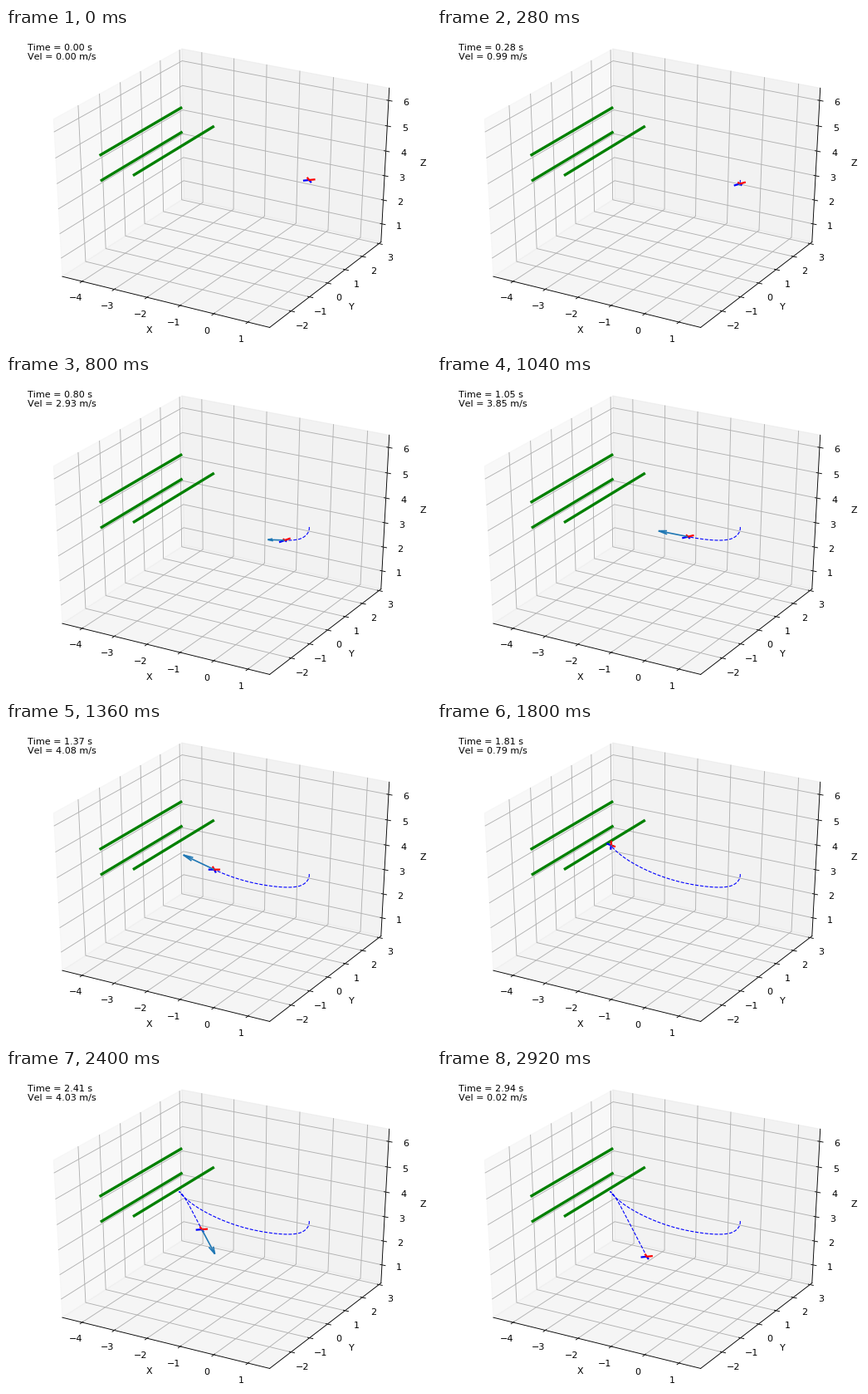
A matplotlib script for the animation above (2.96 s loop, 512 by 384 pixels).

```python
import numpy as np
import matplotlib.pyplot as plt
from matplotlib.animation import FuncAnimation
from matplotlib.patches import Polygon

W, H, DPI = 512, 384, 80
FRAMES, INTERVAL = 74, 40
DT = 0.04022                      # simulated seconds per frame

plt.rcParams["font.family"] = "DejaVu Sans"
plt.rcParams["text.kerning_factor"] = 6

# Perspective camera looking at a cube of data space
CENTER = np.array([-1.497, 0.0, 3.355])
SIZE, DIST = 6.0, 10.0
ELEV, AZIM = np.radians(30), np.radians(-60)
SE, CE, SA, CA = np.sin(ELEV), np.cos(ELEV), np.sin(AZIM), np.cos(AZIM)
RIGHT = np.array([-SA, CA, 0])
UP = np.array([-SE * CA, -SE * SA, CE])
TOWARD = np.array([CE * CA, CE * SA, SE])


def project(points):
    """Data points (n, 3) to stage pixels, y pointing down."""
    d = (np.asarray(points, float) - CENTER) / SIZE
    depth = DIST - d @ TOWARD
    px = W * (d @ RIGHT / depth + 0.095) / 0.185
    py = H - H * (d @ UP / depth + 0.095) / 0.185
    return px, py


fig = plt.figure(figsize=(W / DPI, H / DPI), dpi=DPI, facecolor="white")
ax = fig.add_axes([0, 0, 1, 1])
ax.set_xlim(0, W)
ax.set_ylim(H, 0)
ax.axis("off")


def line3d(points, **style):
    return ax.plot(*project(points), **style)[0]


def label3d(point, text, va):
    px, py = project([point])
    ax.text(px[0], py[0], text, fontsize=10, ha="center", va=va)


# Box: three panes meeting in the far corner, then the axes
LO, HI = CENTER - SIZE * 25 / 48, CENTER + SIZE * 25 / 48
DELTA = SIZE / 12
PER_POINT = 48 / (72 * (W + H) / DPI) * DELTA
FAR = np.where([0, 1, 0], HI, LO)


def flipped(p, i):
    p = p.copy()
    p[i] = LO[i] + HI[i] - p[i]
    return p


def draw_pane(i, shade):
    j, k = (n for n in range(3) if n != i)
    side, top = flipped(FAR, j), flipped(FAR, k)
    corners = [FAR, side, flipped(side, k), top]
    ax.add_patch(Polygon(np.column_stack(project(corners)), facecolor=shade,
                         edgecolor=shade, alpha=0.5, lw=1, zorder=0))


def draw_axis(name, i, j, k, ticks):
    """Axis i, on the far side of direction j; its grid then turns along k."""
    edge = flipped(FAR, j)
    edge[i] = LO[i]
    end = flipped(edge, i)
    out = np.sign(edge - CENTER)
    out[i] = 0
    step = np.zeros(3)
    step[j] = out[j] * DELTA

    line3d([edge, end], color="black", lw=0.8, zorder=1)
    for value in ticks:
        path = np.array([edge, FAR, flipped(FAR, k)])
        path[:, i] = value
        line3d(path, color="#b0b0b0", lw=0.8, zorder=1)
        p = path[0]
        line3d([p - 0.1 * step, p + 0.2 * step], color="black", lw=0.8, zorder=1)
        text = str(value).replace("-", "\N{MINUS SIGN}")
        label3d(p + out * 11.5 * PER_POINT, text, "top")
    label3d((edge + end) / 2 + out * 25 * PER_POINT, name, "center")


for i, shade in enumerate(["0.95", "0.9", "0.925"]):
    draw_pane(i, shade)
draw_axis("X", 0, 1, 2, range(-4, 2))
draw_axis("Y", 1, 0, 2, range(-2, 4))
draw_axis("Z", 2, 0, 1, range(1, 7))

for x, z in [(-4, 4.75), (-4, 3.75), (-3, 4.25)]:
    line3d([(x, -2, z), (x, 2, z)], color="green", lw=3, zorder=2)

# Flight in the plane y = 0, written as x + iz.
# Key points: step, position, velocity; the craft bounces between the legs.
BOUNCE, LAST = 44, FRAMES - 1
PERCH = -2.86 + 4.27j
APPROACH = [(0, 1 + 4.2j, 0),
            (14, 0.809 + 3.716j, -1.25 - 1.28j),
            (26, -0.516 + 3.379j, -3.85 - 0.1j),
            (34, -1.798 + 3.574j, -3.86 + 1.32j),
            (BOUNCE, PERCH, -1.5 + 2.1j)]
RETREAT = [(BOUNCE, PERCH, 0.64 - 0.15j),
           (60, -2.18 + 2.946j, 1.65 - 3.68j),
           (LAST, -1.756 + 1.96j, 0.01 - 0.017j)]


def flight(step):
    """Position and velocity by cubic Hermite segments."""
    leg = APPROACH if step < BOUNCE else RETREAT
    i = max(n for n, key in enumerate(leg[:-1]) if key[0] <= step)
    (t0, p, m), (t1, q, n) = leg[i], leg[i + 1]
    span = (t1 - t0) * DT
    s = (step - t0) / (t1 - t0)
    m, n = m * span, n * span
    c2 = 3 * (q - p) - 2 * m - n
    c3 = m + n - 2 * (q - p)
    return (p + s * (m + s * (c2 + s * c3)),
            (m + s * (2 * c2 + s * 3 * c3)) / span)


def pitch(step):
    """Lean into the run, flare at the perch, then level out."""
    s = step / BOUNCE
    if s < 1:
        return 2.86 * s - 4.06 * s ** 2
    return -1.2 * ((LAST - step) / (LAST - BOUNCE)) ** 4


def spatial(c, y=0):
    return np.array([c.real, y, c.imag])


SUB = 4
PATH = np.array([spatial(flight(n / SUB)[0]) for n in range(LAST * SUB + 1)])
ARM = 0.097

trail, = ax.plot([], [], "--", color="blue", lw=1, zorder=3)
rear, = ax.plot([], [], color="blue", lw=2, zorder=4)
front, = ax.plot([], [], color="red", lw=2, zorder=4)
arrow = [ax.plot([], [], color="#1f77b4", lw=1.5, zorder=5,
                 solid_capstyle="butt")[0] for _ in range(3)]
clock = ax.text(0.05 * W, H - 0.93 * H, "", fontsize=10)
meter = ax.text(0.05 * W, H - 0.90 * H, "", fontsize=10)


def update(k):
    pos, vel = flight(k)
    speed = abs(vel)
    trail.set_data(*project(PATH[:k * SUB + 1]))

    nose = ARM * np.exp(1j * pitch(k))
    for part, y in ((rear, -ARM), (front, ARM)):
        part.set_data(*project([spatial(pos - nose, y), spatial(pos),
                                spatial(pos + nose, y)]))

    shaft = 0.0595 * speed * vel
    tip = pos + shaft
    barb = np.exp(1j * np.radians(15))
    ends = [pos, tip - 0.3 * shaft * barb, tip - 0.3 * shaft / barb]
    for part, end in zip(arrow, ends):
        part.set_data(*project([spatial(end), spatial(tip)]))
        part.set_visible(speed > 0)

    clock.set_text(f"Time = {k * DT:.2f} s")
    meter.set_text(f"Vel = {speed:.2f} m/s")
    return [trail, rear, front, *arrow, clock, meter]


anim = FuncAnimation(fig, update, frames=FRAMES, interval=INTERVAL,
                     repeat=True, blit=False)
plt.show()
```
